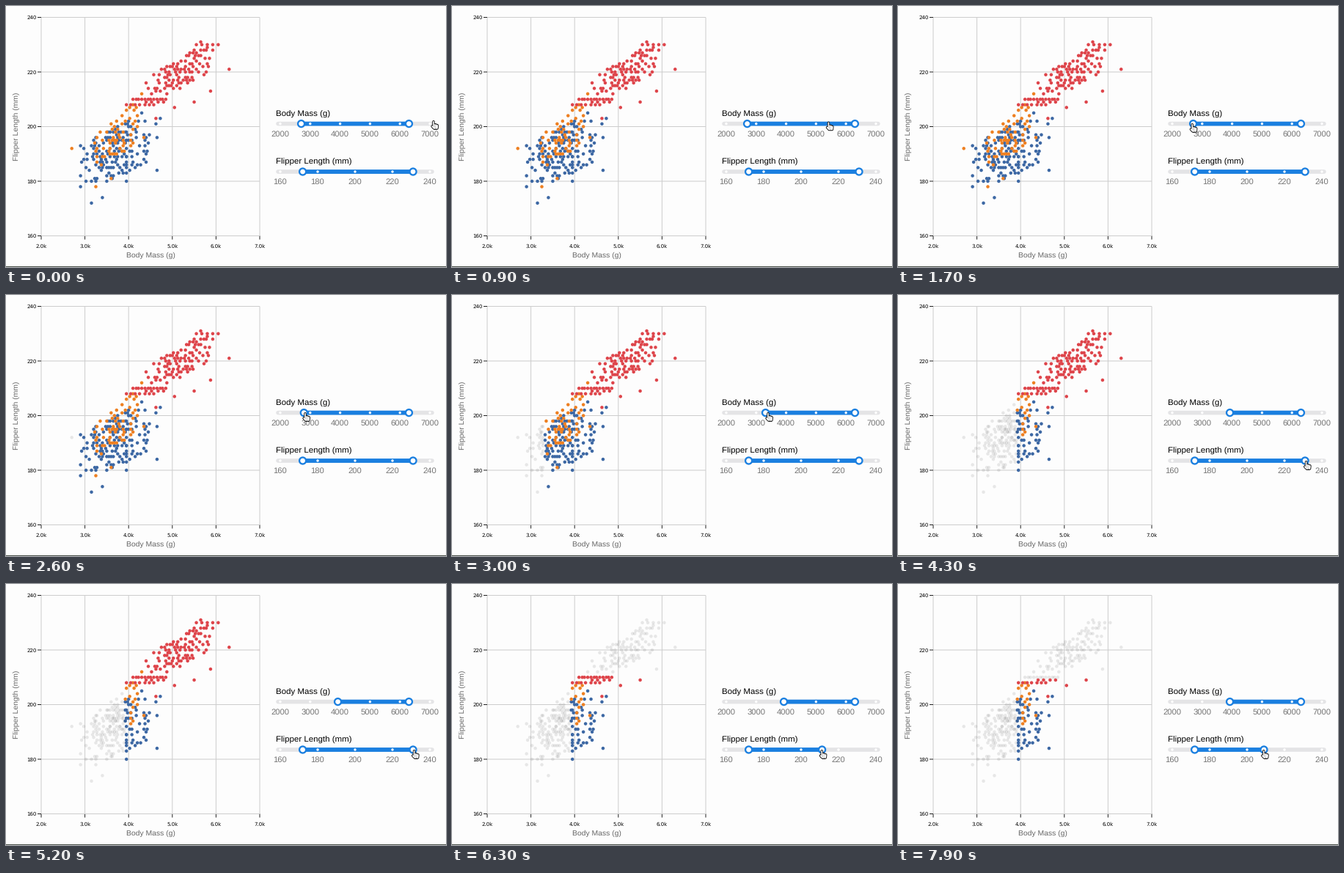
Write a matplotlib script that moves like this. It is 600 by 356 pixels and loops after 8 s.

```python
import matplotlib.pyplot as plt
import numpy as np
from matplotlib.animation import FuncAnimation
from matplotlib.colors import to_rgba
from matplotlib.patches import Circle, Rectangle

W, H, DPI = 600, 356, 100
PX = 72 / DPI
STEP, LOOP = 100, 8000
BLUE, ORANGE, RED = "#3d68a4", "#ee8022", "#de454b"
ACCENT = "#1a7fe0"
DIM = (0, 0, 0, 0.085)

plt.rcParams["font.family"] = "Liberation Sans"
plt.rcParams["text.hinting"] = "none"
plt.rcParams["toolbar"] = "None"

fig = plt.figure(figsize=(W / DPI, H / DPI), dpi=DPI, facecolor="#fdfdfd")
ax = fig.add_axes([0, 0, 1, 1])
ax.set_xlim(0, W)
ax.set_ylim(H, 0)
ax.axis("off")


def line(xs, ys, color, width=1, z=1, cap="butt"):
    return ax.plot(xs, ys, color=color, lw=width * PX, zorder=z,
                   solid_capstyle=cap, snap=False)[0]


def label(x, y, text, size, color, ha="center", **kw):
    kw.setdefault("va", "baseline")
    ax.text(x, y, text, fontsize=size * PX, color=color, ha=ha, zorder=4, **kw)


# ---- scatter plot ----
def plot_x(mass):
    return 48 + (np.asarray(mass) - 2000) * 0.0596


def plot_y(flipper):
    return 15.5 + (240 - np.asarray(flipper)) * 3.725


def draw_axes():
    left, right = plot_x(2000), plot_x(7000)
    top, bottom = plot_y(240), plot_y(160)
    for mass in range(2000, 7001, 1000):
        x = plot_x(mass)
        line([x, x], [top, bottom], "#cdcdcd")
        line([x, x], [bottom, bottom + 5], "#222222")
        label(x, 329.8, f"{mass / 1000:.1f}k", 7, "black", family="DejaVu Sans")
    for flipper in range(160, 241, 20):
        y = plot_y(flipper)
        line([left, right], [y, y], "#cdcdcd")
        line([left - 5, left], [y, y], "#222222")
        label(41.7, y + 2.6, str(flipper), 7, "black", ha="right",
              family="DejaVu Sans")
    label(197, 343, "Body Mass (g)", 10.4, "#686868")
    label(14, 164.5, "Flipper Length (mm)", 10.4, "#686868",
          rotation=90, va="center")


def cloud(rng, count, mass, flipper, slope, spread, m_range, f_range):
    """Distinct correlated points on a 25 g by 1 mm lattice; mass is (mean, sd)."""
    out = set()
    while len(out) < count:
        m = round(rng.normal(*mass) / 25) * 25
        off = rng.uniform(-1.7, 1.7) * spread
        f = round(flipper + slope * (m - mass[0]) + off)
        near = {(m - 25, f), (m + 25, f), (m, f - 1), (m, f + 1)}
        if (m_range[0] <= m <= m_range[1] and f_range[0] <= f <= f_range[1]
                and not near & out):
            out.add((m, f))
    return sorted(out)


def row(flipper, first, last, count):
    return [(round(m / 25) * 25, flipper)
            for m in np.linspace(first, last, count)]


rng = np.random.RandomState(11)
blue = cloud(rng, 136, (3700, 430), 190.5, 0.0065, 5.5, (2900, 4725), (180, 202))
blue += [(3950, f) for f in range(180, 199, 3)]
blue += [(3150, 172), (3400, 174), (2900, 178), (4300, 205), (4725, 203),
         (4650, 184)]

orange = cloud(rng, 60, (3700, 310), 196, 0.012, 4.5, (3200, 4550), (186, 212))
orange += [(2700, 192), (3250, 178), (3600, 181), (4300, 212)]

red = cloud(rng, 92, (5200, 430), 219.5, 0.0095, 3.4, (4400, 5950), (212, 229))
red += row(210, 4100, 4850, 12) + row(208, 3950, 4575, 7)
red += row(209, 4400, 4800, 4) + row(230, 5550, 6050, 5)
red += [(4625, 203), (5050, 207), (5500, 209), (5650, 231), (5875, 213),
        (6300, 221)]

masses, flippers = np.array(blue + orange + red).T
base = np.array([to_rgba(BLUE)] * len(blue) + [to_rgba(ORANGE)] * len(orange)
                + [to_rgba(RED)] * len(red))

draw_axes()
dots = ax.scatter(plot_x(masses), plot_y(flippers), s=(4.5 * PX) ** 2,
                  c=base, linewidths=0, zorder=3)


# ---- range sliders ----
class Slider:
    def __init__(self, y, title, lo, hi, step):
        self.y, self.lo, self.span = y, lo, hi - lo
        label(368, y - 10.3, title, 11.5, "black", ha="left")
        line([371, 581], [y, y], "#e4e4e6", 5.6, 5, "round")
        self.bar = line([], [], ACCENT, 5.8, 6)
        for value in range(lo, hi + 1, step):
            x = self.at(value)
            ax.add_patch(Circle((x, y), 1.7, fc="white", lw=0, zorder=7))
            label(x, y + 17.2, str(value), 11.3, "#757575")
        self.knobs = [ax.add_patch(Circle((0, y), 4.5, fc="white", ec=ACCENT,
                                          lw=2.3 * PX, zorder=8))
                      for _ in range(2)]

    def at(self, value):
        return 374 + 204 * (value - self.lo) / self.span

    def set(self, low, high):
        xs = [self.at(low), self.at(high)]
        self.bar.set_data(xs, [self.y, self.y])
        for knob, x in zip(self.knobs, xs):
            knob.center = (x, self.y)


mass_slider = Slider(160.6, "Body Mass (g)", 2000, 7000, 1000)
flip_slider = Slider(226, "Flipper Length (mm)", 160, 240, 20)

# ---- hand pointer: round-ended strokes, dark below and white on top ----
FINGERS = [(0, 1.2, 0, 9), (1.9, 5.2, 1.9, 10.6), (3.7, 5.6, 3.7, 10.6),
           (5.4, 6.4, 5, 10.4), (-1.9, 7.6, 0.6, 10.4)]
gap = np.nan
hand_x = np.array([v for x0, _, x1, _ in FINGERS for v in (x0, x1, gap)])
hand_y = np.array([v for _, y0, _, y1 in FINGERS for v in (y0, y1, gap)])
hand = [line([], [], color, width, z, "round")
        for color, width, z in (("#1a1a1a", 3.5, 10), ("white", 1.6, 11))]

ax.add_patch(Rectangle((0, 354.8), W, 1.2, fc="#4c524c", lw=0, zorder=12))


# ---- motion ----
def ease(t, start, end, a, b):
    u = np.clip((t - start) / (end - start), 0, 1)
    return a + (b - a) * u * u * (3 - 2 * u)


def low_mass(t):
    return ease(t, 2400, 3600, 2700, 3925)


def high_flip(t):
    return ease(t, 5280, 6550, 231, 209)


def pointer(t):
    """Glide to the first knob, drag it, glide to the second, drag it."""
    first = mass_slider.at(low_mass(t + 75)) - 1.3
    second = flip_slider.at(high_flip(t)) + ease(t, 5280, 6300, 1.5, -0.3)
    if t < 3700:
        return ease(t, 500, 1450, 583, first), ease(t, 500, 1450, 156.5, 160.5)
    return ease(t, 3700, 4150, first, second), ease(t, 3700, 4150, 160.5, 226.5)


def draw(i):
    t = i * STEP
    low, high = low_mass(t), high_flip(t)
    mass_slider.set(low, 6300)
    flip_slider.set(172, high)

    colors = base.copy()
    colors[(masses < low) | (flippers > high)] = DIM
    dots.set_facecolors(colors)

    x, y = pointer(t)
    for stroke in hand:
        stroke.set_data(x + hand_x, y + hand_y)


anim = FuncAnimation(fig, draw, frames=LOOP // STEP, interval=STEP,
                     repeat=True, repeat_delay=0)
plt.show()
```
